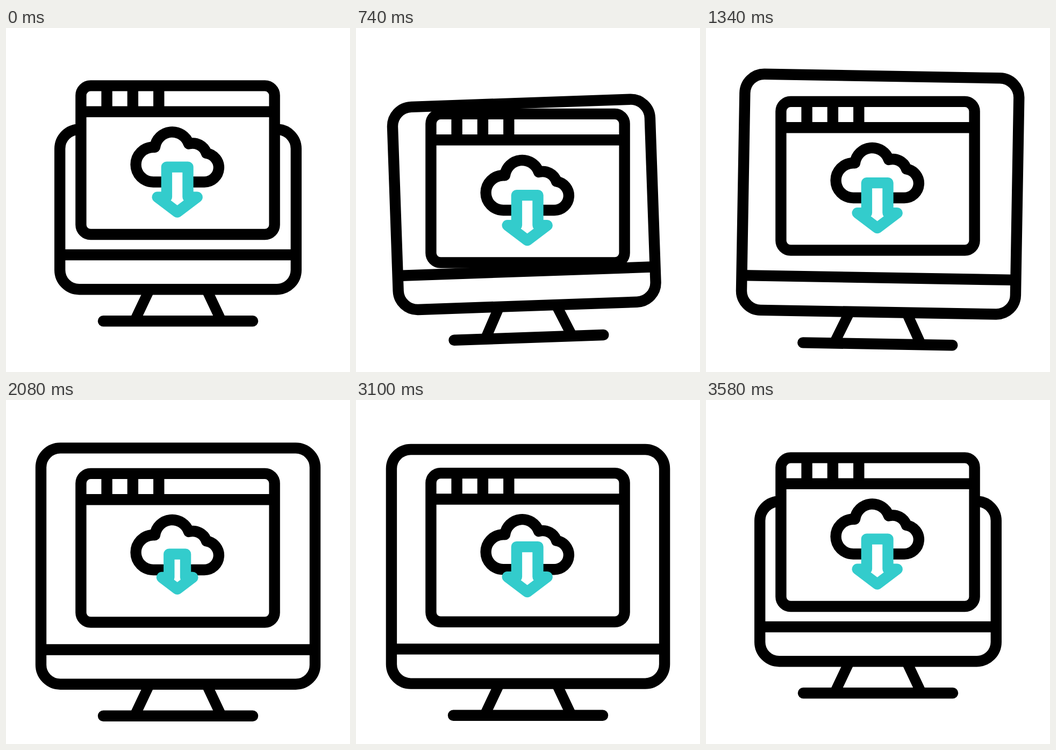
An HTML page that plays this animation: 640x640 px, repeating every 3.6 s.

```html
<!DOCTYPE html>
<html lang="en">
<head>
<meta charset="utf-8">
<title>Cloud download</title>
<style>
  html, body { margin: 0; width: 100%; height: 100%; overflow: hidden; background: #fff; }
  svg { display: block; width: 640px; height: 640px; }
  svg * { stroke-linejoin: round; }
</style>
</head>
<body>
<svg viewBox="0 0 640 640" fill="none" stroke="#000" stroke-width="20.4">
  <clipPath id="pane"><path d="M149 166H490V374.5H149Z"/></clipPath>
  <g id="monitor">
    <path d="M267.2 486L239.3 545M372.8 486L400.7 545" stroke-width="19.5"/>
    <path d="M181 545.3H459" stroke-linecap="round"/>
    <rect id="frame" rx="36"/>
    <path id="chin"/>
  </g>
  <g id="browser">
    <rect x="139.4" y="107.4" width="360.2" height="276.6" rx="18" fill="#fff"/>
    <path d="M139.4 155.8H499.6M187.6 107.4V156M235.9 107.4V156M284.3 107.4V156"/>
    <path d="M277 221.7H274a32.4 32.4 0 0 0 0 64.8H369A26.9 26.9 0 0 0 373 233A27 27 0 0 0 340 215.5A32.5 32.5 0 0 0 277 221.7Z"/>
    <g clip-path="url(#pane)">
      <path id="arrow" fill="#fff" stroke="#3cc" vector-effect="non-scaling-stroke"
        d="M-19.8 -42H19.8V14H37L0 42L-37 14H-19.8Z"/>
    </g>
  </g>
</svg>
<script>
const LOOP = 3600;
const [monitor, frame, chin, browser, arrow] =
  ['monitor', 'frame', 'chin', 'browser', 'arrow'].map(id => document.getElementById(id));

const set = (node, attributes) => {
  for (const name in attributes) node.setAttribute(name, attributes[name]);
};
const linear = (t, start, end) => Math.min(1, Math.max(0, (t - start) / (end - start)));
const ease = (t, start, end) => {
  const u = linear(t, start, end);
  return u * u * (3 - 2 * u);
};

function drawMonitor(t, back) {
  const grow = ease(t, 435, 1000) - back;
  const lift = -45 * ease(t, 200, 515) + 87.5 * ease(t, 515, 809) - 42.5 * back;
  const tilt = -2 * ease(t, 440, 740) + 4 * ease(t, 740, 1180) - 2 * ease(t, 1180, 1500);
  const x = 100.2 - 35.2 * grow, y = 188.6 - 141.7 * grow;
  set(frame, { x, y, width: 640 - 2 * x, height: 486.2 - y });
  set(chin, { d: `M${x} 422H${640 - x}` });
  set(monitor, { transform: `translate(0 ${lift}) rotate(${tilt} 320 505)` });
}

function drawBrowser(t, back) {
  const drop = 52.5 * ease(t, 200, 570) - 23 * ease(t, 745, 1060) - 29.5 * back;
  set(browser, { transform: `translate(0 ${drop})` });
}

// The arrow winds up, falls out of the pane and comes back in from the top.
function drawArrow(t) {
  const leaving = t < 2700;
  const fall = -26.5 * ease(t, 1500, 1800) + 155 * linear(t, 1800, 2580) ** 2.25;
  const enter = -187 * (1 - linear(t, 2920, 3170)) ** 2;
  const scale = leaving ? 1 - 0.225 * ease(t, 1800, 2080) + 0.175 * linear(t, 2080, 2580) : 1;
  set(arrow, { transform: `translate(318.7 ${300.6 + (leaving ? fall : enter)}) scale(${scale})` });
}

function tick() {
  const t = performance.now() % LOOP;
  const back = ease(t, 3055, 3530);
  drawMonitor(t, back);
  drawBrowser(t, back);
  drawArrow(t);
  requestAnimationFrame(tick);
}
tick();
</script>
</body>
</html>
```
